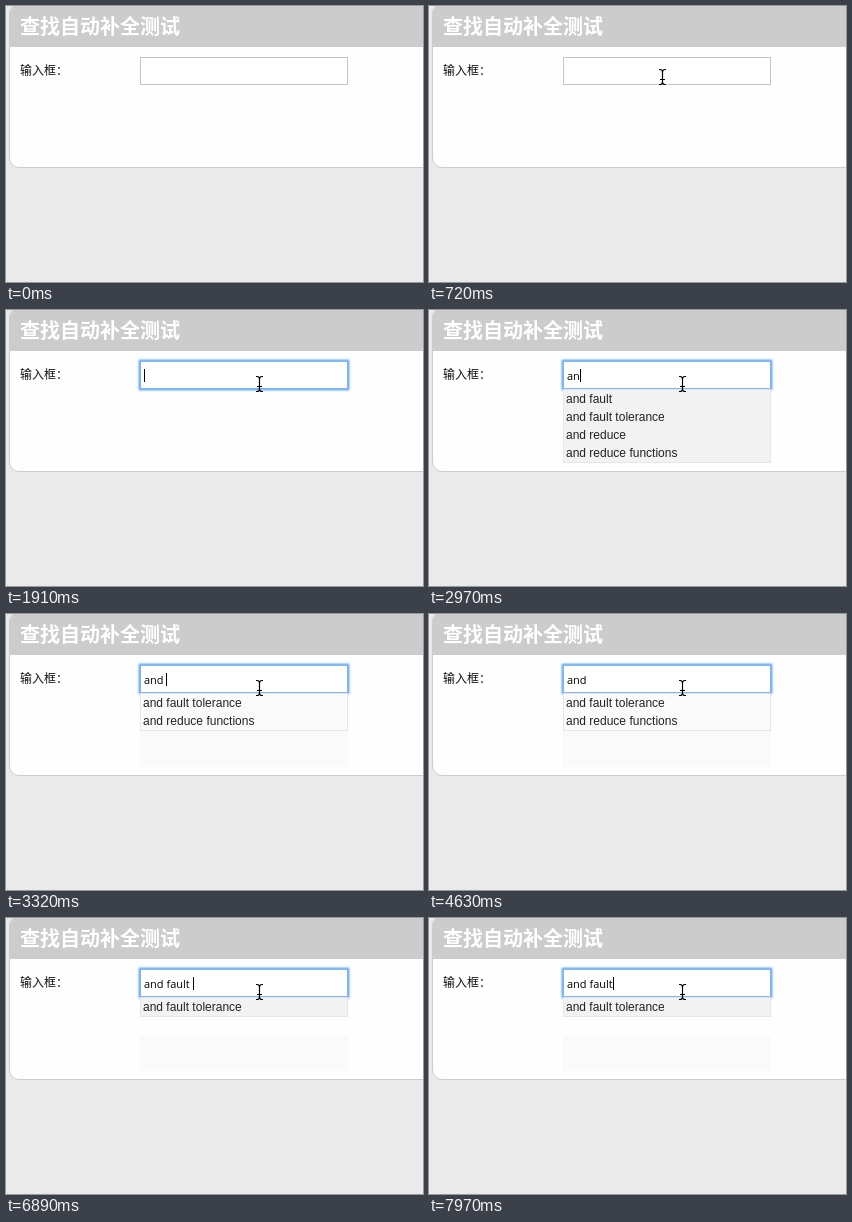
An HTML page for the animation above (8000 ms loop, 417 px wide and 276 px high).

```html
<!DOCTYPE html>
<html lang="zh">
<head>
<meta charset="utf-8">
<title>查找自动补全测试</title>
<style>
  html, body { margin: 0; width: 100%; height: 100%; overflow: hidden; background: #eaeaea; }
  #stage { position: relative; width: 417px; height: 276px; overflow: hidden; background: #eaeaea; }
  #stage * { position: absolute; box-sizing: border-box; }
  .panel { left: 3px; top: -3px; width: 440px; height: 165px; overflow: hidden;
    background: #fefefe; border: 1px solid #ccc; border-radius: 10px; }
  .panel i { left: 0; top: 0; width: 100%; height: 43px; background: #ccc; }
  .title, .label { left: 14px; white-space: pre; font-family: "Noto Sans CJK SC", "Noto Sans CJK", sans-serif; }
  .title { top: 0; font-size: 20px; line-height: 40px; font-weight: bold; color: #fff; }
  .label { top: 55px; font-size: 12px; line-height: 18px; color: #111; }
  .field { left: 134px; top: 51px; width: 208px; height: 28px; background: #fff; border: 1px solid #c4c4c4; }
  .field.focus { border-color: #7fb5ee; box-shadow: 0 0 2px 1px #69acf6, 0 0 2px 1px #8cc0f8; }
  #typed { left: 138px; top: 58px; font: 11px/15px "Open Sans", sans-serif; color: #000; white-space: pre; }
  #stage #typed span { position: static; }
  #caret { top: 1px; width: 1px; height: 13px; background: #000; }
  #shade { left: 134px; top: 117px; width: 208px; height: 36px; background: #fafafa; }
  #list { left: 134px; top: 79px; width: 208px; border: 1px solid #e6e6e6;
    font: 12px/18px "Liberation Sans", Arial, sans-serif; color: #222; }
  #stage #list div { position: static; height: 18px; padding-left: 2px; white-space: pre; }
  #pointer { left: 0; top: 0; width: 417px; height: 276px; }
</style>
</head>
<body>
<div id="stage">
  <div class="panel"><i></i></div>
  <div class="title">查找自动补全测试</div>
  <div class="label">输入框：</div>
  <div class="field" id="field"></div>
  <div id="shade"></div>
  <div id="list"></div>
  <div id="typed"><span id="text"></span><b id="caret"></b></div>
  <svg id="pointer" viewBox="0 0 417 276">
    <path id="arrow" d="M0 0V15L3.5 12L6 17.5L8.5 16.5L6 11H11Z" fill="#000" stroke="#fff"/>
    <g id="beam" fill="none">
      <path d="M-3 -7.5H-2Q.5 -7.5 .5 -5V5Q.5 7.5 -2 7.5H-3M4 -7.5H3Q.5 -7.5 .5 -5M.5 5Q.5 7.5 3 7.5H4M-2 2.5H3"
        stroke="#000" stroke-width="1.2"/>
    </g>
  </svg>
</div>
<script>
const LOOP = 8000;
const items = ["and fault", "and fault tolerance", "and reduce", "and reduce functions"];
const ALL = [0, 1, 2, 3], PAIR = [1, 3], ONE = [1];
const FRESH = "#f2f2f2", CALM = "#fafafa";

// time, pointer shape, x, y
const moves = [
  [0, "", 0, 0],
  [360, "arrow", 368, 101], [480, "arrow", 317, 86], [600, "beam", 262, 66],
  [720, "beam", 233, 71], [830, "beam", 243, 73], [950, "beam", 263, 76],
  [1310, "beam", 260, 76], [1430, "beam", 256, 75], [1550, "beam", 253, 74]
];

// time, typed text, caret visible, suggestions, list colour
const states = [
  [0, "", 0, [], CALM],
  [1910, "", 1, [], CALM], [2260, "", 0, [], CALM],
  [2740, "a", 1, ALL, CALM], [2850, "an", 1, ALL, FRESH],
  [3090, "and", 1, ALL, FRESH], [3200, "and ", 1, ALL, CALM],
  [3320, "and ", 1, PAIR, CALM], [3680, "and ", 0, PAIR, CALM],
  [4160, "and ", 1, PAIR, CALM], [4630, "and ", 0, PAIR, CALM], [5230, "and ", 1, PAIR, CALM],
  [5470, "and f", 1, ONE, FRESH], [5590, "and fa", 1, ONE, CALM],
  [5830, "and fau", 1, ONE, CALM], [6060, "and faul", 1, ONE, CALM],
  [6300, "and fault", 1, ONE, CALM],
  [6780, "and fault ", 1, ONE, CALM], [6890, "and fault ", 1, ONE, FRESH],
  [7010, "and fault ", 1, ONE, CALM], [7370, "and fault ", 0, ONE, CALM],
  [7850, "and fault", 1, ONE, CALM], [7970, "and fault", 1, ONE, FRESH]
];

const $ = id => document.getElementById(id);
const show = (id, on) => { $(id).style.display = on ? "" : "none"; };
const at = (steps, t) => steps.findLast(s => s[0] <= t);
let lastMove, lastState;

function drawPointer([, shape, x, y]) {
  for (const id of ["arrow", "beam"]) {
    show(id, id === shape);
    $(id).setAttribute("transform", `translate(${x} ${y})`);
  }
}

function drawState([time, text, caret, rows, colour]) {
  $("field").classList.toggle("focus", time >= 1910);
  $("text").textContent = text;
  show("caret", caret);
  show("shade", time >= 3320);
  show("list", rows.length);
  $("list").style.background = colour;
  $("list").replaceChildren(...rows.map(i => {
    const row = document.createElement("div");
    row.textContent = items[i];
    return row;
  }));
}

function tick() {
  const t = performance.now() % LOOP;
  const move = at(moves, t), state = at(states, t);
  if (move !== lastMove) drawPointer(lastMove = move);
  if (state !== lastState) drawState(lastState = state);
  requestAnimationFrame(tick);
}
tick();
</script>
</body>
</html>
```
